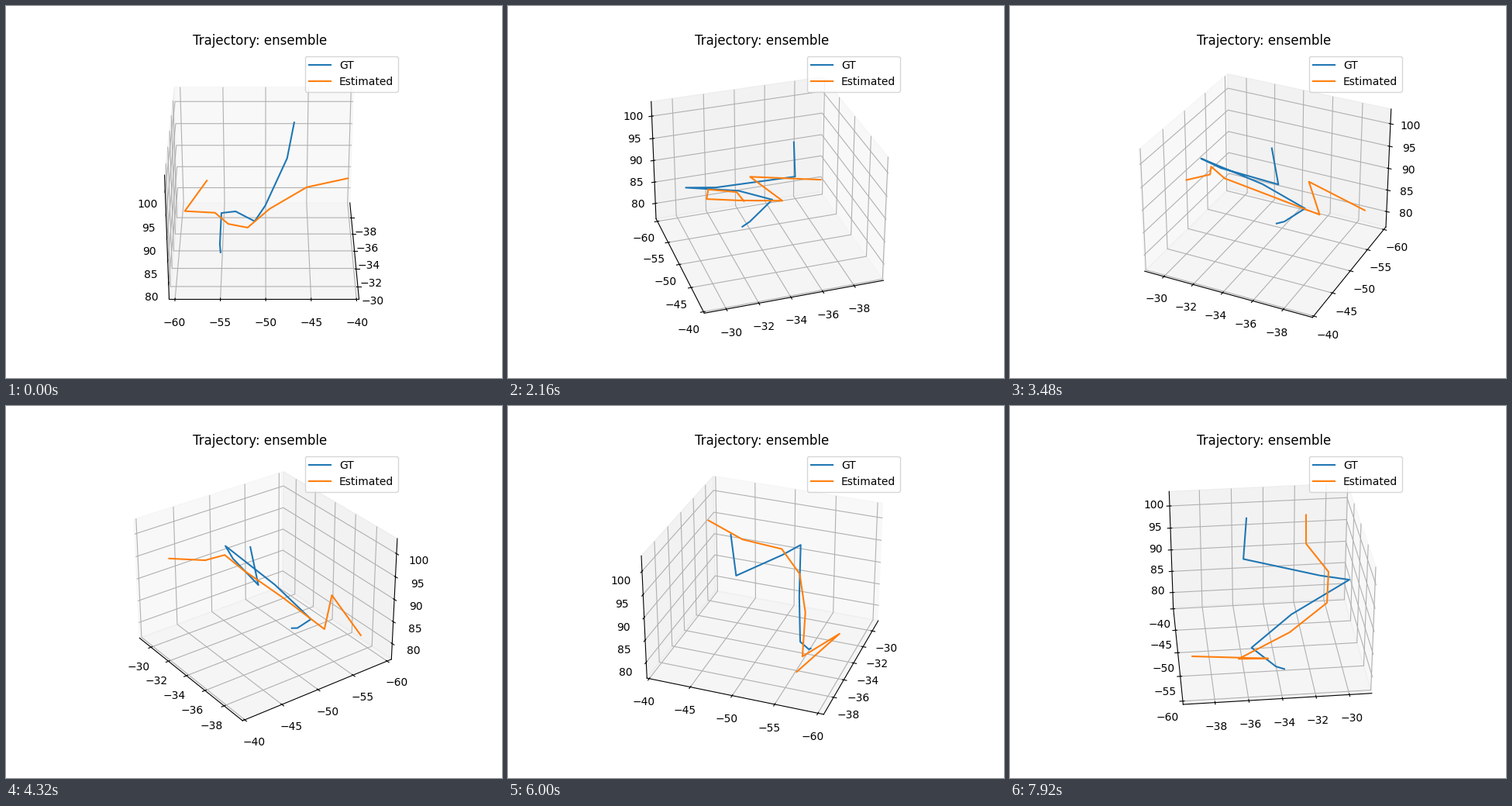
Recreate the animation shown at these times as a matplotlib script. Size 640 by 480 pixels, loop 8000 ms.

```python
import matplotlib.pyplot as plt
from matplotlib.animation import FuncAnimation

LOOP = 8000        # ms
INTERVAL = 40      # ms per frame
HOLD = 3           # frames per camera step
STEP = 4           # degrees per camera step

# Key points of each path, one list per axis
PATHS = {
    "GT": (
        [-35.4, -35.64, -31.08, -29.37, -33.04, -35.55, -34.08, -33.56],
        [-46.8, -47.55, -50.05, -51.2, -53.4, -55.15, -55.3, -55.2],
        [102.7, 94.45, 92.3, 92.15, 87.3, 82.15, 77.7, 76.9],
    ),
    "Estimated": (
        [-31.35, -31.64, -30.53, -30.77, -33.18, -36.37, -34.78, -39.17],
        [-41.05, -45.5, -49.6, -52, -54.25, -55.95, -59.32, -57.05],
        [97.7, 95.25, 92.6, 88.05, 84.2, 80.65, 84.05, 83],
    ),
}


def draw_axes(fig):
    ax = fig.add_subplot(projection="3d")
    for name, path in PATHS.items():
        ax.plot(*path, label=name)
    ax.margins(x=0.05, y=0.05, z=0)
    ax.set_title("Trajectory: ensemble", pad=5.3)
    ax.legend(loc="upper right")
    return ax


def update(i):
    ax.view_init(elev=30, azim=STEP * (i // HOLD))
    return []


fig = plt.figure(figsize=(6.4, 4.8), dpi=100)
ax = draw_axes(fig)
anim = FuncAnimation(fig, update, frames=LOOP // INTERVAL, interval=INTERVAL,
                     repeat=True, repeat_delay=0)
plt.show()
```
